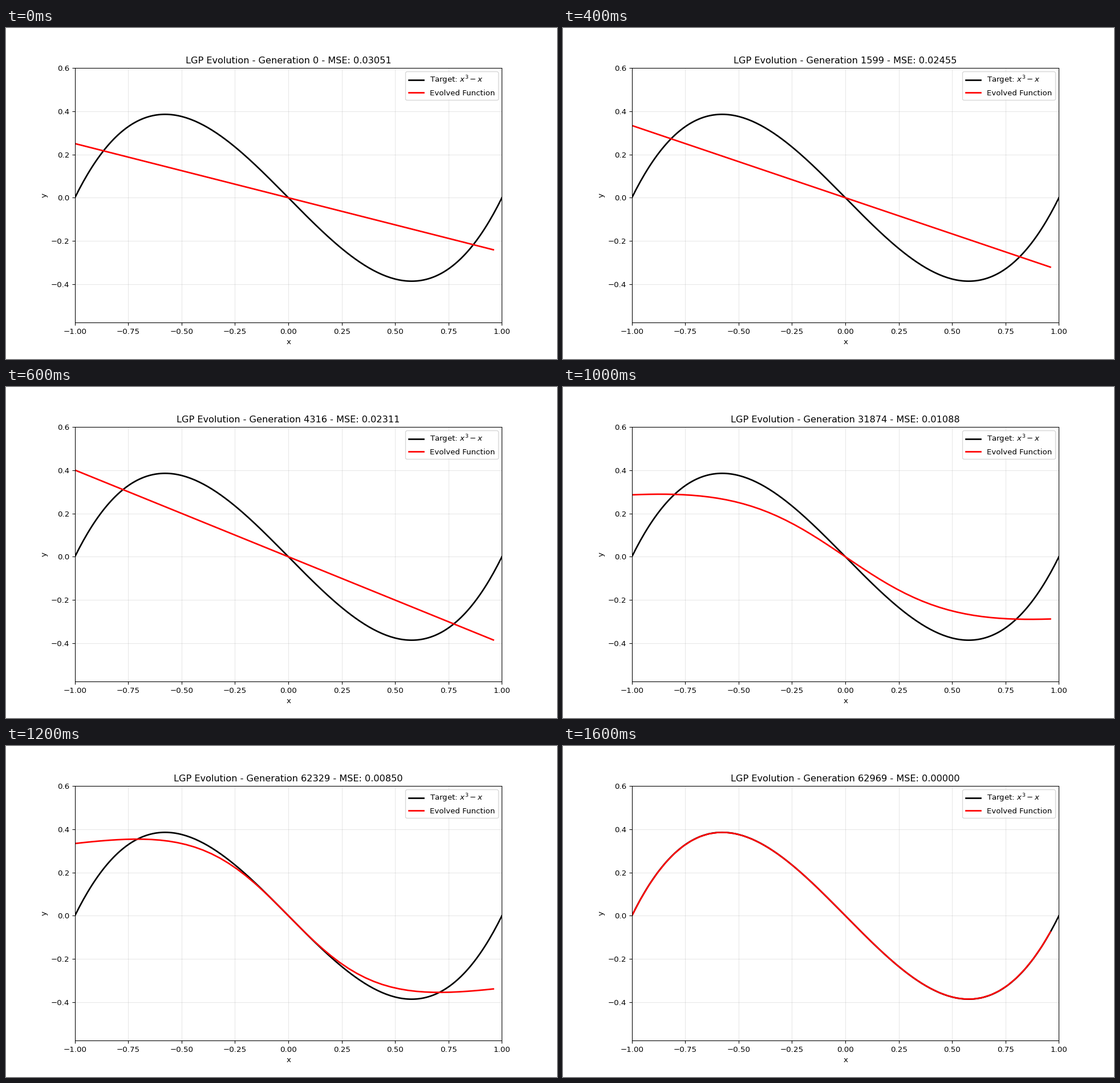
Animation of 966x580 px, one loop 1.8 s. Source, as a matplotlib script:

```python
import numpy as np
import matplotlib.pyplot as plt
from matplotlib.animation import FuncAnimation

DPI = 96.6
WIDTH, HEIGHT = 966, 580


def target(x):
    return x**3 - x


def ratio(a, b=0):
    """Odd rational curve -x / (a + b x^2)."""
    return lambda x: -x / (a + b * x**2)


# (generation, best function so far)
STEPS = [
    (0, ratio(4)),
    (94, ratio(2)),
    (1599, ratio(3)),
    (4316, ratio(2.5)),
    (8625, ratio(2, 1)),
    (31874, ratio(1.5, 2)),
    (62329, ratio(1, 2)),
    (62541, ratio(1, 3)),
    (62969, target),
]

samples = np.arange(50) * 0.04 - 1
smooth = np.linspace(-1, 1, 200)

# The tiny margin keeps the pixel height from rounding down.
fig, ax = plt.subplots(figsize=(WIDTH / DPI, (HEIGHT + 0.001) / DPI), dpi=DPI)
ax.plot(smooth, target(smooth), color="black", lw=2, label="Target: $x^3 - x$")
evolved, = ax.plot([], [], color="red", lw=2, label="Evolved Function")
ax.set_xlim(-1, 1)
ax.set_ylim(-0.576, 0.6)
ax.set_xlabel("x")
ax.set_ylabel("y")
ax.grid(alpha=0.3)
ax.legend(loc="upper right")
title = ax.set_title("")


def draw(step):
    generation, func = STEPS[step]
    y = func(samples)
    mse = np.mean((y - target(samples)) ** 2)
    evolved.set_data(samples, y)
    title.set_text(f"LGP Evolution - Generation {generation} - MSE: {mse:.5f}")
    return evolved, title


anim = FuncAnimation(fig, draw, frames=len(STEPS), interval=200,
                     repeat=True, repeat_delay=0, blit=False)
plt.show()
```
